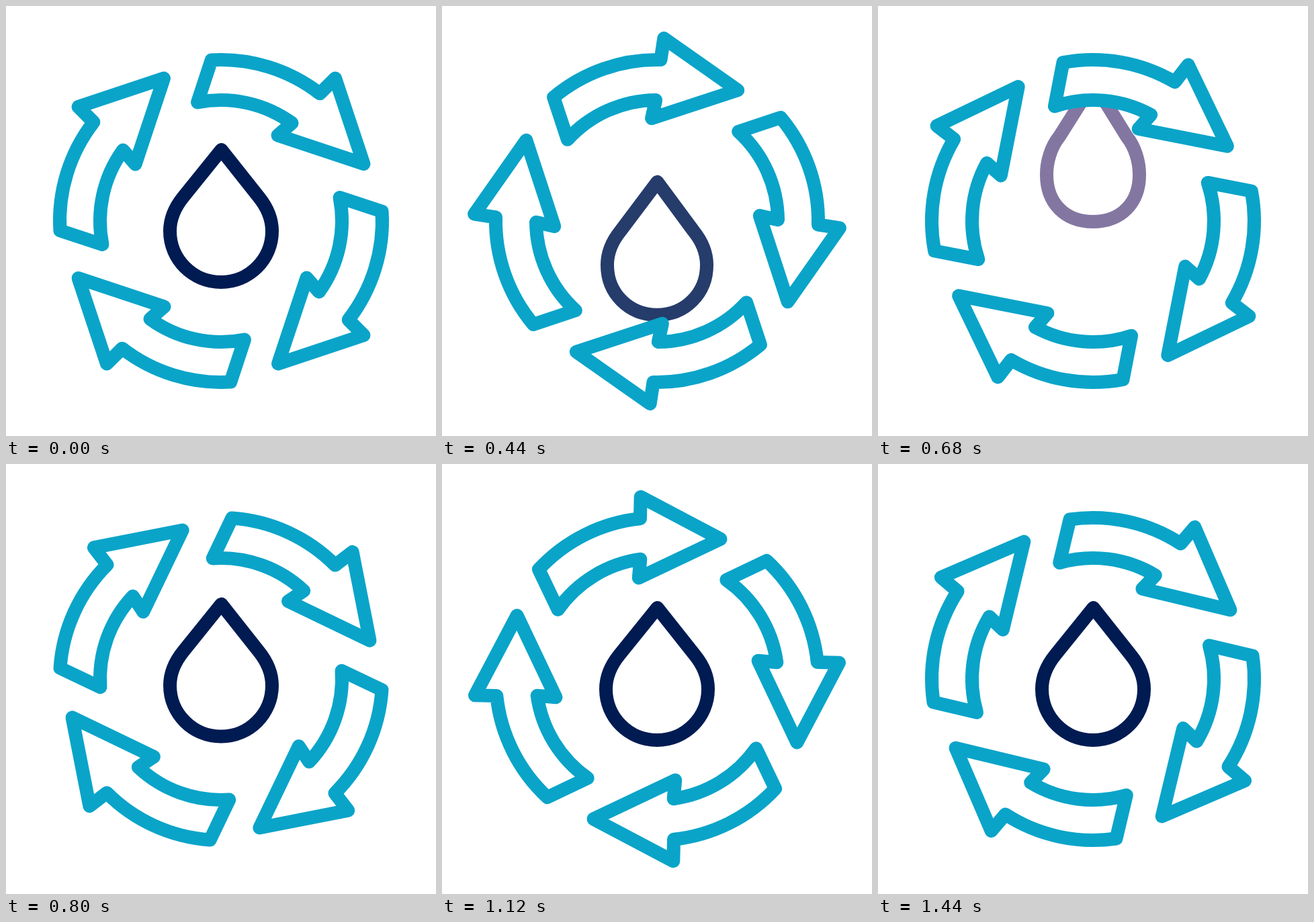
An HTML page with a canvas for the animation above (1480 ms loop, 640 by 640 pixels).

```html
<!DOCTYPE html>
<html lang="en">
<head>
<meta charset="utf-8">
<title>Water recycling</title>
<style>
  html, body { margin: 0; width: 100%; height: 100%; overflow: hidden; background: #fff; }
  canvas { display: block; width: 640px; height: 640px; }
</style>
</head>
<body>
<canvas id="stage" width="640" height="640"></canvas>
<script>
const ctx = document.getElementById('stage').getContext('2d');
const LOOP = 1480, STEP = 40;
const NAVY = [0, 27, 82], PALE = [255, 248, 255], PINK = [252, 205, 236];
const rad = deg => deg * Math.PI / 180;
const mix = (a, b, k) => a.map((v, i) => Math.round(v + (b[i] - v) * k));

// Arrow outline, relative to the centre of the ring.
function arrowPath() {
  ctx.beginPath();
  ctx.arc(0, 0, 240, rad(-93.4), rad(-52.2));
  ctx.lineTo(170, -212.5);
  ctx.lineTo(212.4, -85);
  ctx.lineTo(84.5, -127.5);
  ctx.arc(0, 0, 180, rad(-54.1), rad(-101.2), true);
  ctx.closePath();
}

function drawArrows(turn) {
  ctx.strokeStyle = '#0aa4c9';
  ctx.fillStyle = '#fff';
  for (let i = 0; i < 4; i++) {
    ctx.save();
    ctx.rotate(turn + i * Math.PI / 2);
    arrowPath();
    ctx.fill();
    ctx.stroke();
    ctx.restore();
  }
}

// The drop leaves downwards, speeding up, and comes back from the top, slowing down.
function dropOffset(t) {
  if (t <= 340 || t >= 840) return 0;
  if (t < 560) return 280 * Math.pow((t - 340) / 220, 2.24);
  return -280 * Math.pow((840 - t) / 280, 2.03);
}

function drawDrop(offset) {
  const travel = (offset / 90) ** 2;
  const stretch = Math.min(travel, 2);
  const fade = Math.min(travel * 0.52, 1);
  const top = offset - 106 - (offset < 0 ? 10 : 0) * stretch;
  const bottom = offset + 91 + (offset > 0 ? 3 : 0) * stretch;
  const half = 76 - 7 * stretch;
  const shoulder = 56 - 6 * stretch;
  const shoulderY = top + 70 + 10 * stretch;
  const middle = bottom - 76 + 6 * stretch;

  ctx.save();
  ctx.beginPath();
  ctx.arc(0, 0, 180, 0, 2 * Math.PI);
  ctx.clip();
  ctx.beginPath();
  ctx.moveTo(0.5, top);
  ctx.lineTo(shoulder, shoulderY);
  ctx.bezierCurveTo(shoulder + 13, shoulderY + 16, half, middle - 19, half, middle);
  ctx.bezierCurveTo(half, middle + 42, 42, bottom, 0, bottom);
  ctx.bezierCurveTo(-42, bottom, -half, middle + 42, -half, middle);
  ctx.bezierCurveTo(-half, middle - 19, -shoulder - 13, shoulderY + 16, -shoulder, shoulderY);
  ctx.closePath();
  ctx.strokeStyle = `rgb(${mix(NAVY, offset > 0 ? PALE : PINK, fade)})`;
  ctx.stroke();
  ctx.restore();
}

function draw(time) {
  const t = Math.floor((time % LOOP) / STEP) * STEP;
  ctx.setTransform(1, 0, 0, 1, 0, 0);
  ctx.fillStyle = '#fff';
  ctx.fillRect(0, 0, 640, 640);
  ctx.translate(320, 320);
  ctx.lineWidth = 20;
  ctx.lineJoin = ctx.lineCap = 'round';
  drawDrop(dropOffset(t));
  drawArrows(Math.PI * t / LOOP);
}

const start = performance.now();
function tick() {
  draw(performance.now() - start);
  requestAnimationFrame(tick);
}
tick();
</script>
</body>
</html>
```
